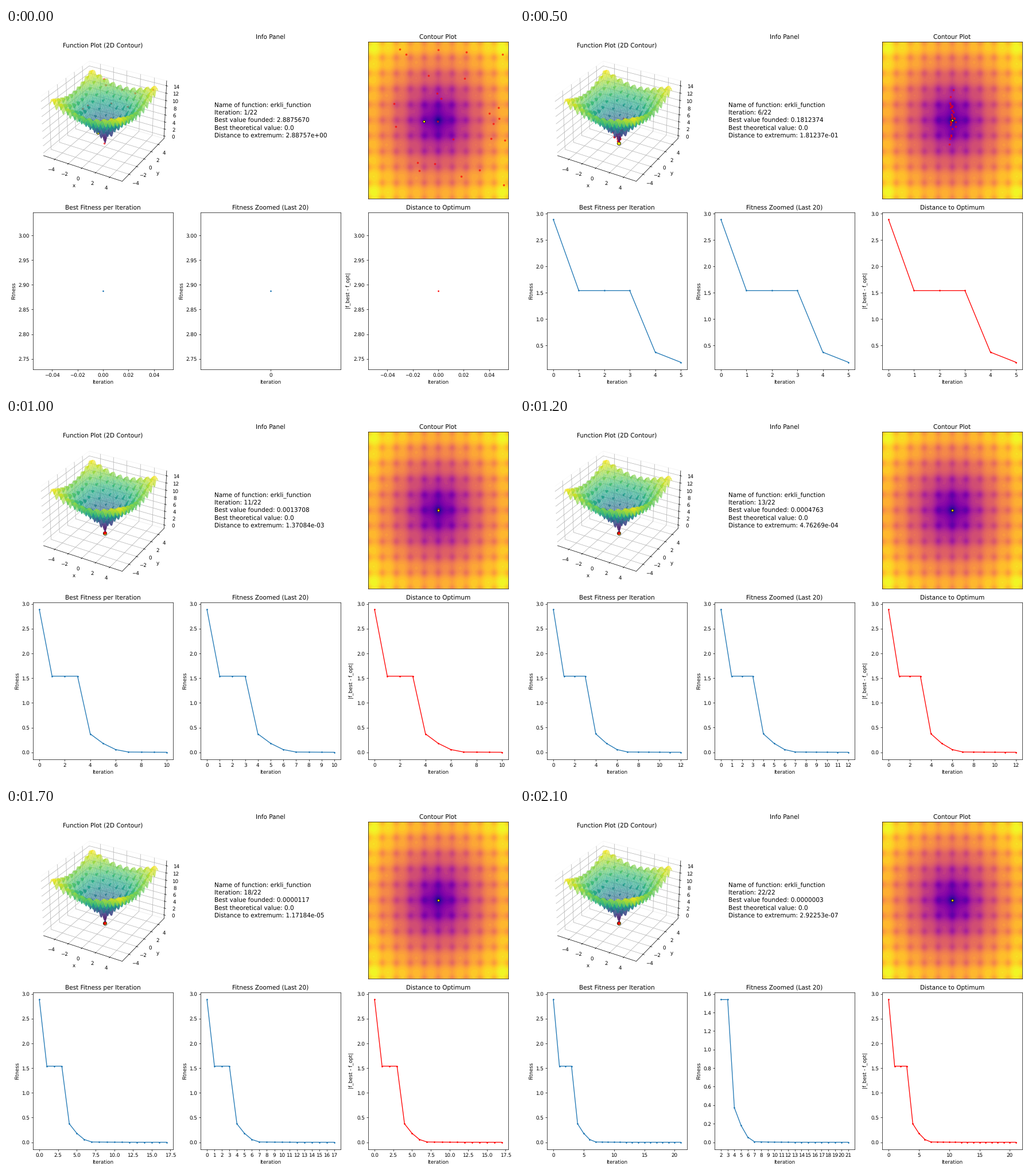
Recreate the animation shown at these times as a matplotlib script. Size 885x632 px, loop 2.2 s.

```python
import numpy as np
import matplotlib.pyplot as plt
from matplotlib.animation import FuncAnimation

W, H, DPI = 885, 632, 63.2
FRAMES, INTERVAL = 22, 100
LAST = 20  # width of the zoomed window, in iterations
SWARM_SIZE = 25
GATHER_AT = 5  # iteration at which the swarm has reached the central basin
FIRST_BEST = np.array([-1.02, -0.085])
LINE_STEP = 13.15  # info text, in pixels

plt.rcParams["text.hinting"] = "none"

# Best value at its turning points; it falls geometrically in between
BEST_VALUES = {0: 2.887567, 1: 1.54, 3: 1.54, 4: 0.372, 5: 0.1812374,
               6: 0.055, 7: 0.0056, 8: 0.00394566, 12: 4.76269e-4,
               15: 2.09603e-5, 19: 6.55151e-6, 21: 2.92253e-7}
history = np.exp(np.interp(np.arange(FRAMES), list(BEST_VALUES),
                           np.log(list(BEST_VALUES.values()))))

rng = np.random.default_rng(4)
scattered = rng.uniform(-4.9, 4.9, (SWARM_SIZE, 2))
gathered = rng.normal(0, (0.12, 0.8), (SWARM_SIZE, 2))


def objective(x, y):
    bowl = -20 * np.exp(-0.2 * np.sqrt(0.5 * (x**2 + y**2)))
    ripple = -np.exp(0.5 * (np.cos(2 * np.pi * x) + np.cos(2 * np.pi * y)))
    return bowl + ripple + np.e + 20


def swarm(k):
    if k < GATHER_AT:
        return gathered + (scattered - gathered) * (1 - k / GATHER_AT) ** 1.5
    return gathered * np.exp(-0.68 * (k - GATHER_AT))


def best_point(k):
    return FIRST_BEST * (history[k] / history[0]) ** 2


fig = plt.figure(figsize=((W + 0.01) / DPI, (H + 0.01) / DPI), dpi=DPI)
fig.subplots_adjust(left=47 / W, right=875 / W, bottom=36 / H, top=608 / H,
                    wspace=48 / 244, hspace=24 / 274)
ax_surf = fig.add_subplot(231, projection="3d")
ax_info, ax_map, ax_fit, ax_zoom, ax_dist = (
    fig.add_subplot(2, 3, i) for i in range(2, 7))

grid = np.linspace(-5, 5, 100)
X, Y = np.meshgrid(grid, grid)
Z = objective(X, Y)

ax_surf.plot_surface(X, Y, Z, cmap="viridis", alpha=0.7)
ax_surf.set(title="Function Plot (2D Contour)", xlabel="x", ylabel="y")
for axis in (ax_surf.xaxis, ax_surf.yaxis, ax_surf.zaxis):
    axis.pane.fill = False

ax_info.axis("off")
ax_info.set_title("Info Panel")
info = [ax_info.text(0.1, 0.5 + (23.1 - i * LINE_STEP) / 274, "", fontsize=12)
        for i in range(5)]

ax_map.contourf(X, Y, Z, levels=50, cmap="plasma")
ax_map.set(title="Contour Plot", xticks=[], yticks=[])
map_swarm = ax_map.scatter([], [], c="red", s=10, alpha=0.6, zorder=3)
map_best = ax_map.scatter([], [], c="yellow", s=20, edgecolors="black", zorder=4)
ax_map.set(xlim=(-5, 5), ylim=(-5, 5))

markers = []


def draw_surface_points(points, best, value):
    while markers:
        markers.pop().remove()
    x, y = points.T
    z = objective(x, y)
    markers.append(ax_surf.scatter(x, y, z, c="red", s=10, alpha=0.6))
    markers.append(ax_surf.scatter([best[0]], [best[1]], [value], c="yellow",
                                   s=50, edgecolors="black"))
    low, high = min(Z.min(), z.min(), value), Z.max()
    pad = (high - low) * (0.05 + 1.1 / 48)
    ax_surf.set_zlim(low - pad, high + pad)


def draw_curve(ax, steps, title, ylabel, color):
    ax.clear()
    ax.plot(steps, history[steps], marker="o", markersize=2, color=color)
    ax.set(title=title, xlabel="Iteration", ylabel=ylabel)


def update(k):
    points, best, value = swarm(k), best_point(k), history[k]
    draw_surface_points(points, best, value)
    map_swarm.set_offsets(points)
    map_best.set_offsets([best])

    lines = ("Name of function: erkli_function",
             f"Iteration: {k + 1}/{FRAMES}",
             f"Best value founded: {value:.7f}",
             "Best theoretical value: 0.0",
             f"Distance to extremum: {value:.5e}")
    for text, line in zip(info, lines):
        text.set_text(line)

    steps = np.arange(k + 1)
    recent = steps[-LAST:]
    draw_curve(ax_fit, steps, "Best Fitness per Iteration", "Fitness", "C0")
    draw_curve(ax_zoom, recent, f"Fitness Zoomed (Last {LAST})", "Fitness", "C0")
    ax_zoom.set_xticks(recent)
    draw_curve(ax_dist, steps, "Distance to Optimum", "|f_best - f_opt|", "red")
    return []


anim = FuncAnimation(fig, update, frames=FRAMES, interval=INTERVAL,
                     repeat=True, repeat_delay=0, blit=False)
plt.show()
```
